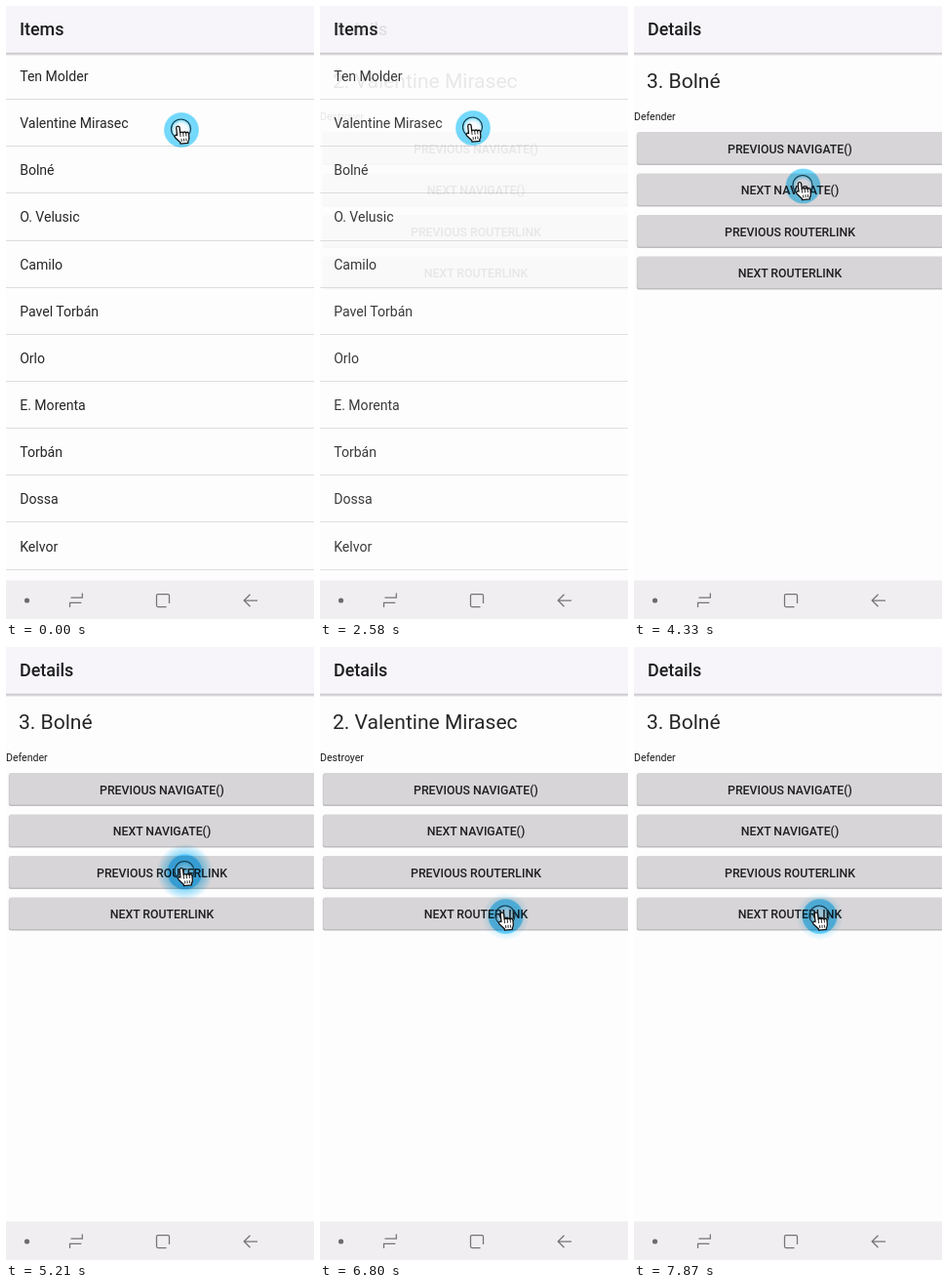
Animation, 316 px wide and 628 px high, one loop 8 s. Source, as an HTML page:

```html
<!DOCTYPE html>
<html lang="en">
<head>
<meta charset="utf-8">
<title>Items</title>
<style>
  html, body { margin: 0; width: 100%; height: 100%; overflow: hidden; background: #fdfdfd; }
  svg { display: block; width: 100%; height: 100%; }
  text { font-family: Roboto, "Open Sans", sans-serif; fill: #262628; }
  .bar { font-size: 17.9px; font-weight: 500; fill: #1c1c1e; }
  .row { font-size: 14.05px; }
  .head { font-size: 21.05px; }
  .role { font-size: 10.55px; fill: #1c1c1e; }
  .btn { font-size: 12.3px; font-weight: 500; text-anchor: middle; fill: #1f1f21; }
  .icon { fill: none; stroke: #747477; stroke-width: 1.25; }
  .halo, .glow { mix-blend-mode: multiply; }
</style>
</head>
<body>
<svg viewBox="0 0 316 628" xmlns="http://www.w3.org/2000/svg">
  <defs>
    <linearGradient id="shade" x1="0" y1="0" x2="0" y2="1">
      <stop offset="0" stop-color="#c6c5c9"/>
      <stop offset=".45" stop-color="#d3d2d5"/>
      <stop offset="1" stop-color="#fdfdfd"/>
    </linearGradient>
    <radialGradient id="halo">
      <stop offset="0" stop-color="#fff"/>
      <stop offset=".36" stop-color="#f4fcff"/>
      <stop offset=".6" stop-color="#78dbfd"/>
      <stop offset=".93" stop-color="#72dafd"/>
      <stop offset="1" stop-color="#9ce5fe"/>
    </radialGradient>
    <radialGradient id="glow">
      <stop offset="0" stop-color="#78d6fb"/>
      <stop offset=".35" stop-color="#86dafb"/>
      <stop offset=".62" stop-color="#8fdcfb"/>
      <stop offset="1" stop-color="#8fdcfb" stop-opacity="0"/>
    </radialGradient>
    <g id="pointer">
      <circle cx="-.5" cy="-1" r="10" fill="none" stroke="#12394a" stroke-width="1.2"/>
      <g transform="rotate(-6 0 5)">
        <path d="M-4.5-2.5a1.7 1.7 0 0 1 3.4 0V3a1.6 1.6 0 0 1 3 .3a1.5 1.5 0 0 1 2.9.5a1.4 1.4 0 0 1 2.7.7V8.5q0 2.5-1.5 4V14H-2V12.5L-6.8 7a1.5 1.5 0 0 1 2.3-1.9Z"
          fill="#fff" stroke="#111" stroke-width="1.3" stroke-linejoin="round"/>
        <path d="M-1.1 3V7M1.9 3.5V7M4.8 4V7M-.4 9V12M2 9V12M4.4 9V12" stroke="#222" stroke-width=".9"/>
      </g>
    </g>
  </defs>
  <rect width="316" height="628" fill="#fdfdfd"/>
  <g id="pages"></g>
  <g id="nav">
    <rect y="588.5" width="316" height="39.5" fill="#f0eef1"/>
    <circle cx="21.5" cy="609" r="2.6" fill="#6c6c6f"/>
    <path class="icon" d="M78.3 601.5V606.2H66.5M65.5 616V611.4H77.3"/>
    <path class="icon" d="M167.5 612V604q0-1.5-1.5-1.5H156q-1.5 0-1.5 1.5V614q0 1.5 1.5 1.5H164.5"/>
    <path class="icon" d="M258 609H244.5M250.5 602.7L244.2 609L250.5 615.3"/>
  </g>
  <g id="ghost" opacity=".5">
    <circle r="18" fill="url(#halo)"/>
    <use href="#pointer"/>
  </g>
  <g id="cursor">
    <circle class="glow" id="pulse" fill="url(#glow)"/>
    <circle class="halo" r="18" fill="url(#halo)"/>
    <use href="#pointer"/>
  </g>
</svg>
<script>
const $ = id => document.getElementById(id);
const LOOP = 8000, PAGE_H = 590;

const names = ["Ten Molder", "Valentine Mirasec", "Bolné", "O. Velusic", "Camilo",
  "Pavel Torbán", "Orlo", "E. Morenta", "Torbán", "Dossa", "Kelvor"];
const buttons = ["PREVIOUS NAVIGATE()", "NEXT NAVIGATE()", "PREVIOUS ROUTERLINK", "NEXT ROUTERLINK"];

const text = (cls, x, y, s) => `<text class="${cls}" x="${x}" y="${y}">${s}</text>`;

const page = (id, title, body) => `<g id="${id}">
  <rect width="316" height="${PAGE_H}" fill="#fdfdfd"/>
  <rect width="316" height="48" fill="#f7f5f9"/>
  <rect y="47.8" width="316" height="3.4" fill="url(#shade)"/>
  ${text("bar", 14, 30, title)}${body}</g>`;

const list = () => names.map((name, i) => {
  const y = 48.15 * i;
  return text("row", 14.2, 77 + y, name) +
    `<rect y="${Math.round(95.1 + y)}" width="316" height="1" fill="#dddce0"/>`;
}).join("");

const details = (n, role) => text("head", 13, 83.6, `${n}. ${names[n - 1]}`) +
  text("role", 0, 117.4, role) +
  buttons.map((label, i) => {
    const y = 129 + 42.5 * i;
    return `<rect x="2.8" y="${y + .8}" width="316" height="33.2" rx="2" fill="#bdbcbf"/>
      <rect x="3.3" y="${y}" width="315" height="32.6" rx="2" fill="#d7d5d8"/>` +
      text("btn", 160, y + 21.5, label);
  }).join("");

$("pages").innerHTML = page("list", "Items", list()) +
  page("second", "Details", details(2, "Destroyer")) +
  page("third", "Details", details(3, "Defender"));

// Bursts of screen updates: start, end, number of updates
const bursts = [[1880, 2230, 5], [2580, 2760, 3], [3020, 3800, 10], [3890, 3890, 1],
  [4070, 4850, 10], [4940, 5030, 2], [5210, 5390, 3], [5570, 6360, 10],
  [6450, 6890, 6], [7070, 7420, 5], [7780, 7870, 2]];

// Page changes; dir 0 fades, 1 slides down, -1 slides up
const changes = [
  { at: 2540, ms: 200, from: "list", to: "second", dir: 0 },
  { at: 4030, ms: 200, from: "second", to: "third", dir: 0 },
  { at: 5532, ms: 300, from: "third", to: "second", dir: -1 },
  { at: 7044, ms: 300, from: "second", to: "third", dir: 1 }
];

// Pointer moves: start, end, x, y
const moves = [[1810, 2050, 157, 125], [3000, 3500, 173.5, 184.5],
  [4500, 5030, 183.5, 230.5], [5900, 6500, 190.5, 276]];
const clicks = [2050, 3708, 5205, 6708, 7775];

const clamp = v => Math.min(1, Math.max(0, v));

function snap(t) {
  let s = 0;
  for (const [a, b, n] of bursts) {
    if (t < a) break;
    const step = (b - a) / (n - 1) || 1;
    s = a + Math.min(n - 1, Math.floor((t - a + 6) / step)) * step;
  }
  return s;
}

function pointerAt(t) {
  let x = 180, y = 127;
  for (const [a, b, tx, ty] of moves) {
    const p = 1 - (1 - clamp((t - a) / (b - a))) ** 2;
    x += (tx - x) * p;
    y += (ty - y) * p;
  }
  return [x, y];
}

function place(id, y, opacity) {
  const el = $(id);
  el.style.display = "";
  el.setAttribute("transform", `translate(0 ${y})`);
  el.setAttribute("opacity", opacity);
  $("pages").append(el);
}

function drawPages(t) {
  for (const id of ["list", "second", "third"]) $(id).style.display = "none";
  const c = changes.filter(c => t >= c.at).pop();
  if (!c) return place("list", 0, 1);
  const k = clamp((t - c.at) / c.ms);
  const p = (1 - Math.cos(Math.PI * k)) / 2;
  if (k < 1) place(c.from, Math.round(c.dir * PAGE_H * p), 1);
  place(c.to, Math.round(-c.dir * PAGE_H * (1 - p)), c.dir ? 1 : p);
}

function drawPointer(t) {
  const [x, y] = pointerAt(t), [gx, gy] = pointerAt(t - 50);
  const moving = Math.hypot(x - gx, y - gy) > .5;
  $("cursor").setAttribute("transform", `translate(${x} ${y})`);
  $("cursor").setAttribute("opacity", moving ? .7 : 1);
  $("ghost").setAttribute("transform", `translate(${gx} ${gy})`);
  $("ghost").style.display = moving ? "" : "none";
  const click = clicks.filter(c => t >= c).pop();
  const level = click === undefined ? 0 : clamp(1 - Math.floor((t - click) / 85) / 2);
  $("pulse").setAttribute("opacity", level);
  $("pulse").setAttribute("r", 20 + 9 * level);
}

let last = -1;
function frame(now) {
  const t = snap(now % LOOP);
  if (t !== last) {
    drawPages(t);
    drawPointer(t);
    last = t;
  }
  requestAnimationFrame(frame);
}
frame(0);
</script>
</body>
</html>
```
